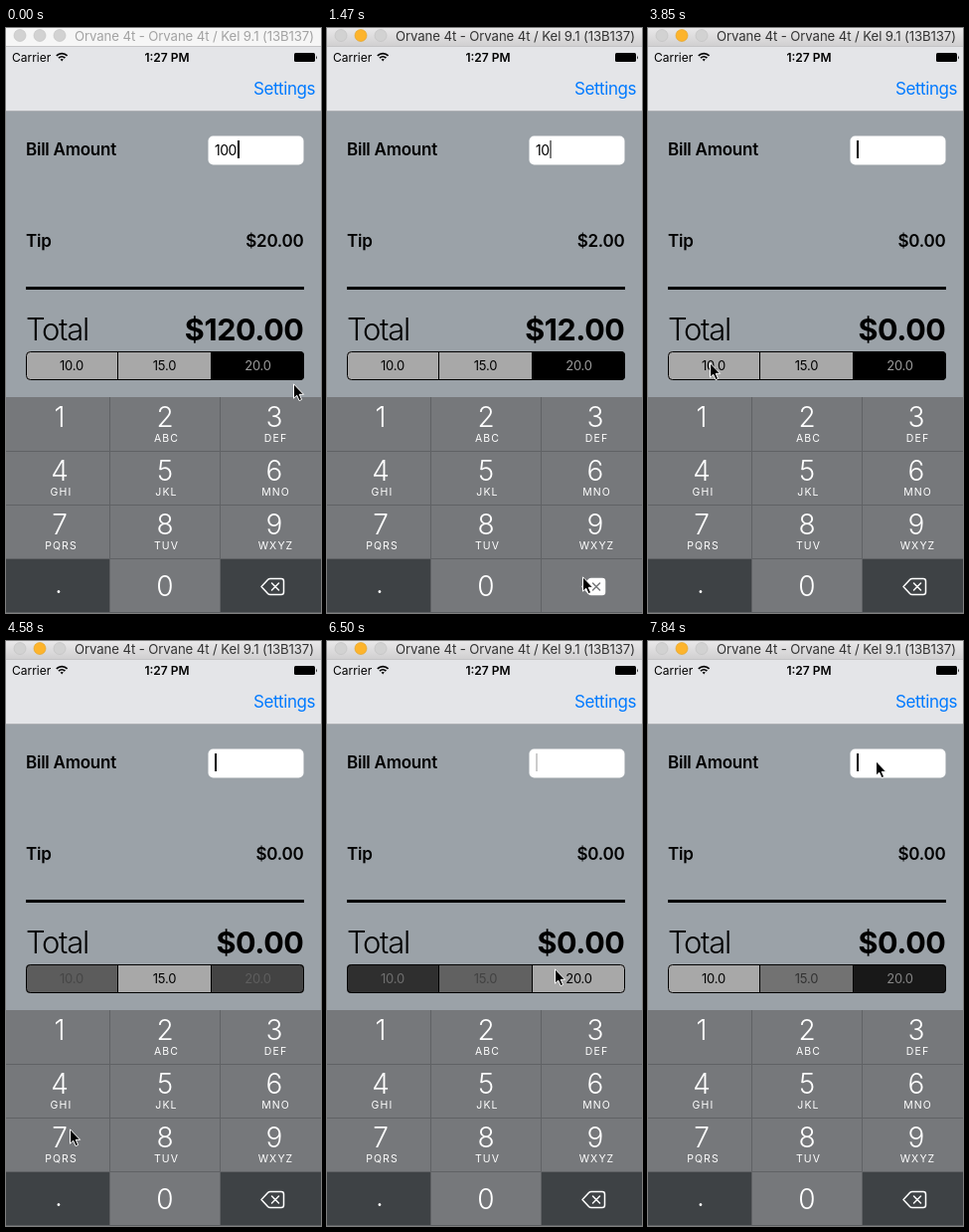
An HTML page for the animation above (7.99 s loop, 317x588 px).

```html
<!DOCTYPE html>
<html lang="en">
<head>
<meta charset="utf-8">
<title>Tip calculator</title>
<style>
  html, body { margin: 0; width: 100%; height: 100%; overflow: hidden; background: #9ba2a8; }
  svg { display: block; width: 317px; height: 588px; font-family: Inter, "Open Sans", sans-serif; }
  text { white-space: pre; }
  .end { text-anchor: end; }
  .mid { text-anchor: middle; }
  .bold { font-weight: 600; font-size: 17px; letter-spacing: -.25px; }
  .digit { font-size: 28px; fill: #fff; font-weight: 300; text-anchor: middle; }
  .abc { font-size: 10.5px; fill: #fff; letter-spacing: 1.1px; text-anchor: middle; }
  .seg { font-size: 13px; letter-spacing: -.2px; text-anchor: middle; }
</style>
</head>
<body>
<svg viewBox="0 0 317 588">
  <defs>
    <linearGradient id="chrome" x2="0" y2="1">
      <stop stop-color="#e9e8e9"/><stop offset="1" stop-color="#d1d0d1"/>
    </linearGradient>
    <clipPath id="pill"><rect x="20" y="325" width="280" height="29" rx="4"/></clipPath>
  </defs>
  <rect width="317" height="588" fill="#9ba2a8"/>

  <rect id="bar" width="317" height="18"/>
  <g id="lights"><circle cx="14" cy="7.5" r="6"/><circle cx="34" cy="7.5" r="6"/><circle cx="54" cy="7.5" r="6"/></g>
  <text id="title" x="69" y="13" font-size="13.2" letter-spacing="-.1">Orvane 4t - Orvane 4t / Kel 9.1 (13B137)</text>

  <rect y="18" width="317" height="65" fill="#e4e5e8"/>
  <rect y="18" width="317" height="1" fill="#c4c4c6"/>
  <rect y="83" width="317" height="1" fill="#aeb0b4"/>
  <text x="6" y="34" font-size="12">Carrier</text>
  <g fill="none" stroke="#000" stroke-width="1.7">
    <path d="M50.8 27.8a7.6 7.6 0 0 1 10.8 0M53 30.2a4.6 4.6 0 0 1 6.4 0"/>
    <path d="M54.6 31.6L56.2 33.4L57.8 31.6Q56.2 30.6 54.6 31.6Z" fill="#000" stroke="none"/>
  </g>
  <text class="mid" x="162" y="34" font-size="12" font-weight="600">1:27 PM</text>
  <rect x="290" y="25" width="21" height="9" rx="1.6"/>
  <path d="M312 27.5q1.5 2 0 4z"/>
  <text class="end" x="311" y="67" font-size="17" letter-spacing="-.45" fill="#007aff">Settings</text>

  <text class="bold" x="20" y="128">Bill Amount</text>
  <rect x="203.5" y="108.5" width="96" height="29" rx="5" fill="#fff"/>
  <text id="bill" x="210" y="127.5" font-size="14" letter-spacing="-.5"></text>
  <rect id="caret" y="113" width="2" height="18"/>
  <text class="bold" x="20" y="220">Tip</text>
  <text id="tip" class="bold end" x="299.5" y="220"></text>
  <rect x="20" y="260" width="280" height="3"/>
  <text x="20" y="314" font-size="31" font-weight="300" letter-spacing="-1.3">Total</text>
  <text id="total" class="end" x="299.5" y="314" font-size="30.5" font-weight="700" letter-spacing="-.4"></text>

  <g id="segs" clip-path="url(#pill)"></g>
  <path d="M112.5 325v29M206.5 325v29" stroke="#000"/>
  <rect x="20.5" y="325.5" width="279" height="28" rx="4" fill="none" stroke="#000"/>

  <g id="keys"></g>
  <g stroke-width="1.5" stroke-linejoin="round" stroke-linecap="round">
    <path id="eraser" d="M257 561.5L263.5 554.5Q264.5 553.5 266 553.5H277Q279.5 553.5 279.5 556V567Q279.5 569.5 277 569.5H266Q264.5 569.5 263.5 568.5Z" stroke="#fff"/>
    <path id="cross" d="M267.5 558l7 7M274.5 558l-7 7"/>
  </g>
  <path id="mouse" d="M.5 .8V15.2L3.7 12.2L6.1 17.6L8.6 16.5L6.2 11.3H10.6Z" stroke="#fff" stroke-width="1" stroke-linejoin="round"/>
</svg>

<script>
const LOOP = 7990, TICK = 147.7, LEAD = 11, LAST = 53;
const $ = id => document.getElementById(id);
const NS = "http://www.w3.org/2000/svg";

function add(parent, tag, attrs, text = "") {
  const el = document.createElementNS(NS, tag);
  for (const name in attrs) el.setAttribute(name, attrs[name]);
  el.textContent = text;
  return parent.appendChild(el);
}

// keypad
const colX = [0, 105, 215, 317], midX = [54, 160, 270];
const letters = ["", "ABC", "DEF", "GHI", "JKL", "MNO", "PQRS", "TUV", "WXYZ"];
const KEY = "#76787b", DARK = "#3e4245";
const keys = $("keys");
let eraseKey;
for (let i = 0; i < 12; i++) {
  const col = i % 3, row = Math.floor(i / 3), y = 371 + row * 54;
  const rect = add(keys, "rect", { x: colX[col], y, width: colX[col + 1] - colX[col], height: 55, fill: row == 3 && col != 1 ? DARK : KEY });
  if (i == 11) eraseKey = rect;
  const label = i < 9 ? i + 1 : [".", "0", ""][col];
  add(keys, "text", { class: "digit", x: midX[col] - (i == 9 ? 1 : 0), y: row < 3 ? y + 30 : 571 - (i == 9 ? 3 : 0) }, label);
  if (i < 9) add(keys, "text", { class: "abc", x: midX[col] + 1.5, y: y + 45 }, letters[i]);
}
add(keys, "path", { d: "M104.5 371V588M215.5 371V588M0 425.5H317M0 479.5H317M0 533.5H317", stroke: "#606265" });
add(keys, "rect", { y: 587, width: 317, height: 1, fill: "#5c5f62" });

// [tick, value...] rows, linear in between
function at(rows, k) {
  let i = rows.findIndex(r => r[0] > k);
  if (i < 0) return rows[rows.length - 1].slice(1);
  if (i == 0) return rows[0].slice(1);
  const a = rows[i - 1], b = rows[i], p = (k - a[0]) / (b[0] - a[0]);
  return a.slice(1).map((v, j) => v + (b[j + 1] - v) * p);
}

const mousePath = [
  [0, 289, 357], [2, 287, 385], [6, 262, 530], [7, 257, 551], [17, 257, 551],
  [18, 150, 330], [19, 71, 130], [21, 71, 130], [24, 62, 330], [25, 62, 336],
  [28, 62, 336], [29, 63, 407], [31, 64, 490], [35, 65, 503], [36, 66, 513],
  [37, 110, 371], [38, 148, 338], [41, 150, 337], [43, 215, 330], [44, 229, 329],
  [48, 230, 330], [51, 152, 322], [52, 150, 318], [53, 229, 120]
];

const segs = [
  { label: "10.0", x: 20, w: 92.5, mid: 66, dark: [[27, 0], [35, .9], [37, 1], [42, 1], [44, .72], [48, 0]] },
  { label: "15.0", x: 112.5, w: 94, mid: 159.5, dark: [[42, 0], [44, .42], [47, 1], [50, .32]] },
  { label: "20.0", x: 206.5, w: 93.5, mid: 253.5, dark: [[27, 1], [35, .2], [37, 0], [46, 0], [50, .86]] }
];
for (const s of segs) {
  s.rect = add($("segs"), "rect", { x: s.x, y: 325, width: s.w, height: 29 });
  s.text = add($("segs"), "text", { class: "seg", x: s.mid, y: 344 }, s.label);
}

const grey = v => `rgb(${v},${v},${v})`;
const money = v => "$" + v.toFixed(2);
const blink = [0, 0, .2, 1, 1, 1, .5];

function caretAlpha(k) {
  if (k < 11) return [1, 1, 1, .5, 0, 0, .2][k % 7];
  return k < 22 ? 1 : blink[k % 7];
}

function draw(k) {
  const active = k >= 9, erasing = k >= 9 && k < 16;
  $("bar").setAttribute("fill", active ? "url(#chrome)" : "#f6f6f6");
  $("title").setAttribute("fill", active ? "#333" : "#a3a3a3");
  [...$("lights").children].forEach((c, i) => {
    c.setAttribute("fill", active && i == 1 ? "#fdb42c" : "#d2d2d2");
    c.setAttribute("stroke", active && i == 1 ? "#dfa023" : "#c0c0c0");
    c.setAttribute("stroke-width", .6);
  });

  const bill = k < 8 ? "100" : k < 12 ? "10" : k < 14 ? "1" : "";
  $("bill").textContent = bill;
  $("tip").textContent = money(bill * .2);
  $("total").textContent = money(bill * 1.2);
  $("caret").setAttribute("x", [210, 217, 224, 233][bill.length]);
  $("caret").setAttribute("opacity", caretAlpha(k));

  for (const s of segs) {
    const [d] = at(s.dark, k);
    s.rect.setAttribute("fill", grey(Math.round(168 * (1 - d))));
    s.text.setAttribute("fill", grey(Math.round(156 * d)));
  }

  eraseKey.setAttribute("fill", erasing ? KEY : DARK);
  $("eraser").setAttribute("fill", erasing ? "#fff" : "none");
  $("cross").setAttribute("stroke", erasing ? KEY : "#fff");
  const [x, y] = at(mousePath, k);
  $("mouse").setAttribute("transform", `translate(${Math.round(x)} ${Math.round(y)})`);
}

function frame() {
  const t = performance.now() % LOOP;
  draw(Math.min(LAST, Math.floor((t + LEAD) / TICK)));
  requestAnimationFrame(frame);
}
frame();
</script>
</body>
</html>
```
